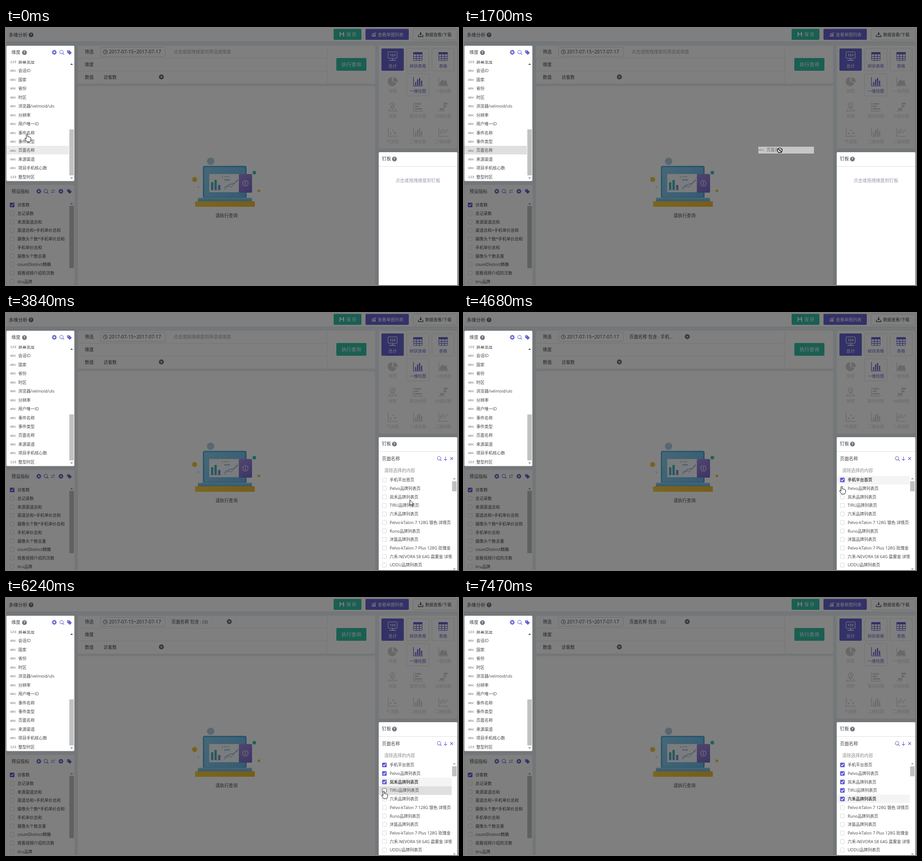
These frames come from a looping animation (992x565 px, 7720 ms). An HTML page with a canvas:

```html
<!DOCTYPE html>
<html lang="zh-CN">
<head>
<meta charset="utf-8">
<title>多维分析</title>
<style>
html, body { margin: 0; width: 100%; height: 100%; overflow: hidden; background: #7f7f7f; }
canvas { display: block; }
</style>
</head>
<body>
<canvas id="stage" width="992" height="565"></canvas>
<script>
const c = document.getElementById('stage').getContext('2d');
const LOOP = 7720, PURPLE = '#6663cf', GREEN = '#34bfa3', INK = '#454545', PALE = '#d2d2d2';

// ---- drawing helpers ----
function text(s, x, cy, size = 9, color = INK, align = 'left', weight = 400) {
  c.font = `${weight} ${size}px "Open Sans", "Noto Sans CJK SC", "Noto Sans CJK", sans-serif`;
  c.textAlign = align;
  c.fillStyle = color;
  c.fillText(s, x, cy + size * 0.37);
}
function tag(s, x, cy, color = '#6d7078') {
  c.font = '8px "Liberation Sans", sans-serif';
  c.textAlign = 'left';
  c.fillStyle = color;
  c.fillText(s, x, cy + 2.4);
}
function box(x, y, w, h, fill, r = 0, stroke) {
  c.beginPath();
  c.roundRect(x, y, w, h, r);
  if (fill) { c.fillStyle = fill; c.fill(); }
  if (stroke) { c.strokeStyle = stroke; c.lineWidth = 1; c.stroke(); }
}
function dot(x, y, r, fill) {
  c.beginPath();
  c.arc(x, y, r, 0, 7);
  c.fillStyle = fill;
  c.fill();
}
function ring(x, y, r, color, w = 1) {
  c.beginPath();
  c.arc(x, y, r, 0, 7);
  c.strokeStyle = color;
  c.lineWidth = w;
  c.stroke();
}
function line(color, w, ...p) {
  c.beginPath();
  for (let i = 0; i < p.length; i += 2) c.lineTo(p[i], p[i + 1]);
  c.strokeStyle = color;
  c.lineWidth = w;
  c.stroke();
}
function poly(color, ...p) {
  c.beginPath();
  for (let i = 0; i < p.length; i += 2) c.lineTo(p[i], p[i + 1]);
  c.closePath();
  c.fillStyle = color;
  c.fill();
}
function clipped(x, y, w, h, draw) {
  c.save();
  c.beginPath();
  c.rect(x, y, w, h);
  c.clip();
  draw();
  c.restore();
}
function gradient(x0, y0, x1, y1, a, b) {
  const g = c.createLinearGradient(x0, y0, x1, y1);
  g.addColorStop(0, a);
  g.addColorStop(1, b);
  return g;
}

// ---- icons ----
function help(x, y) {
  dot(x, y, 5.2, '#6c707c');
  text('?', x, y, 8, '#fff', 'center', 700);
}
function gear(x, y) {
  ring(x, y, 3.2, PURPLE, 2.4);
  for (let i = 0; i < 8; i++) {
    const a = i * Math.PI / 4, s = Math.sin(a), k = Math.cos(a);
    line(PURPLE, 1.8, x + 3 * k, y + 3 * s, x + 5.4 * k, y + 5.4 * s);
  }
}
function lens(x, y) {
  ring(x - 0.7, y - 0.7, 3.8, PURPLE, 1.1);
  line(PURPLE, 1.3, x + 2, y + 2, x + 5, y + 5);
}
function label(x, y) {
  poly(PURPLE, x - 5, y - 4.5, x, y - 4.5, x + 5.5, y + 1, x + 1, y + 5.5, x - 5, y);
  dot(x - 2.6, y - 2.3, 0.9, '#fff');
}
function closeDot(x, y) {
  dot(x, y, 5.4, '#6f6f6f');
  line('#fff', 1.1, x - 1.8, y - 1.8, x + 1.8, y + 1.8);
  line('#fff', 1.1, x + 1.8, y - 1.8, x - 1.8, y + 1.8);
}
function check(x, y, state, edge = '#d4d4d4') {
  if (state === 'on') {
    box(x - 5, y - 5, 10, 10, '#5d59d0', 1.5);
    line('#fff', 1.5, x - 2.8, y, x - 0.8, y + 2.2, x + 3, y - 2.4);
  } else if (state === 'press') {
    box(x - 4.5, y - 4.5, 9, 9, '#dddcf3', 1.5, '#5d59d0');
  } else {
    box(x - 4.5, y - 4.5, 9, 9, '#fff', 1.5, edge);
  }
}
const upArrow = (x, y, col) => poly(col, x - 3, y + 1.5, x, y - 1.8, x + 3, y + 1.5);
const downArrow = (x, y, col) => poly(col, x - 3, y - 1.5, x, y + 1.8, x + 3, y - 1.5);

function gridIcon(x, y, col) {
  box(x - 9.5, y - 9, 19, 18, null, 1, col);
  box(x - 10, y - 9.5, 20, 5, col);
  for (const d of [-3.3, 3.3]) line(col, 1.3, x + d, y - 5, x + d, y + 9);
  for (const d of [0, 4.6]) line(col, 1.3, x - 10, y + d, x + 10, y + d);
}
function axes(x, y, col) {
  line(col, 1.3, x - 9.5, y - 10, x - 9.5, y + 9.5, x + 11, y + 9.5);
}
function barIcon(x, y, col) {
  axes(x, y, col);
  [7, 13, 16, 10].forEach((h, i) => box(x - 6 + i * 4.3, y + 8 - h, 2.5, h, col));
}
function hBarIcon(x, y, col) {
  axes(x, y, col);
  [14, 9, 16].forEach((w, i) => box(x - 7, y - 8 + i * 5.5, w, 3, col));
}
function flagIcon(x, y, col) {
  line(col, 1.2, x - 10, y + 9, x + 2, y + 9, x + 2, y - 10);
  box(x + 2, y - 9, 8, 4, col);
  box(x + 2, y - 3, 5, 4, col);
  box(x - 7, y + 3, 8, 4, col);
}
function pieIcon(x, y, col) {
  c.fillStyle = col;
  for (const [dx, a, b] of [[-1, 0.3, 4.7], [1.5, 4.75, 6.4]]) {
    c.beginPath();
    c.moveTo(x + dx, y);
    c.arc(x + dx, y, 10, a, b);
    c.fill();
  }
}
function areaIcon(x, y, col) {
  axes(x, y, col);
  poly(col, x - 8, y + 8, x - 8, y + 3, x - 2, y - 5, x + 3, y - 1, x + 7, y - 4, x + 10, y + 8);
}
function lineIcon(x, y, col) {
  axes(x, y, col);
  line(col, 1.3, x - 7, y + 5, x - 2, y - 1, x + 3, y + 2, x + 10, y - 6);
  line(col, 1.3, x - 7, y, x - 1, y - 6, x + 4, y - 3);
}
function bubbleIcon(x, y, col) {
  axes(x, y, col);
  dot(x - 4, y + 3, 1.8, col);
  dot(x + 1, y - 4, 1.5, col);
  dot(x + 6, y + 2, 2, col);
}
function mapIcon(x, y, col) {
  ring(x, y - 4, 5, col, 1.4);
  dot(x, y - 4, 1.8, col);
  line(col, 1.4, x - 4, y, x, y + 6, x + 4, y);
  line(col, 1.3, x - 5, y + 4, x - 9, y + 9, x + 9, y + 9, x + 5, y + 4);
}
function totalIcon(x, y, col) {
  box(x - 10, y - 10, 20, 14, null, 1.5, col);
  text('123', x, y - 3, 7.5, col, 'center', 700);
  line(col, 1.5, x, y + 4, x, y + 8);
  line(col, 1.5, x - 7, y + 8.5, x + 7, y + 8.5);
}

// ---- page sections under the shade ----
function header() {
  box(0, 0, 992, 30, '#fff');
  line('#d9dde2', 1, 0, 30.5, 992, 30.5);
  text('多维分析', 6, 15, 10.3);
  help(55, 15);
  box(719, 2, 61, 24, GREEN, 2);
  box(732, 9, 10, 10, '#fff', 1);
  box(734.5, 9, 5, 3.5, GREEN);
  box(734, 14.5, 6, 4.5, GREEN);
  text('保 存', 747, 14.5, 9.7, '#fff');
  box(789, 2, 95, 24, PURPLE, 2);
  line('#fff', 1.4, 803, 15, 806, 12, 808, 13.5, 812, 9.5);
  [3, 4, 5].forEach((h, i) => box(803 + i * 3, 19 - h, 2, h, '#fff'));
  text('查看单图列表', 816, 14.5, 9.4, '#fff');
  box(893.5, 2.5, 97, 24, '#fff', 2, '#dcdcdc');
  line(INK, 1.8, 910, 9, 910, 14);
  downArrow(910, 14.5, INK);
  line(INK, 1.3, 905, 15, 905, 19, 915, 19, 915, 15);
  text('数据查看/下载', 920, 15, 9.1);
}

function query(t) {
  box(158, 39, 652, 83, '#fff', 2);
  for (const y of [66.5, 94.5]) line('#e7e7e7', 1, 158, y, 704, y);
  line('#e7e7e7', 1, 704.5, 39, 704.5, 122);
  ['筛选', '维度', '数值'].forEach((s, i) => text(s, 173, 52 + i * 28, 9.7));
  box(207.5, 42.5, 142, 20, '#fff', 2, '#dcdcdc');
  ring(218, 52.5, 4.5, '#555');
  line('#555', 1, 218, 49.5, 218, 53, 220.5, 53);
  text('2017-07-15~2017-07-17', 226, 52.5, 10.4);
  const n = CLICKS.filter(k => t >= k).length;
  if (n) {
    text('页面名称 包含 : ' + (n > 1 ? `(${n})` : '手机...'), 363, 52, 9.7);
    closeDot(490, 52);
  } else {
    text('点击或拖拽维度到筛选或维度', 368, 52, 9.7, '#a9a9a9');
  }
  text('访客数', 214, 108, 9.7);
  closeDot(341, 107.5);
  box(725, 66, 66, 28, GREEN, 2);
  text('执行查询', 758, 80, 10.7, '#fff', 'center');
}

function laptop() {
  dot(449, 293, 8, '#b3cfe6');
  dot(545, 318, 4, '#3bc8b0');
  dot(414, 333, 5.5, '#f2c53c');
  dot(555, 358, 3, '#f2c53c');
  dot(422, 350, 2, '#bfe0e6');
  box(432, 303, 96, 71, gradient(432, 303, 528, 374, '#58b4e2', '#4a9fd8'), 4);
  box(435, 306, 90, 66, gradient(435, 306, 525, 372, '#8ed0ee', '#69b9e6'), 2);
  box(446, 321, 72, 40, '#f5f9fd', 1);
  [[450, 17, '#3cbf9f'], [457.5, 22, '#3cbf9f'], [465.5, 11, '#8f85d6']].forEach(([x, h, col]) =>
    box(x, 356 - h, 5, h, gradient(0, 356 - h, 0, 356, col, '#56a7d8'), 1));
  line('#b6c6d4', 0.7, 448, 356.5, 472, 356.5);
  line('#59b6a5', 1, 479, 355, 488, 347, 494, 350, 509, 332);
  line('#7184b8', 1, 479, 351, 490, 344, 500, 342, 509, 335);
  line('#9eacba', 1, 475, 325, 475, 330);
  for (let i = 0; i < 3; i++) {
    box(479 + i * 4, 326, 2.5, 1.5, '#9eacba');
    dot(481 + i * 4, 334, 1.4, ['#3cbf9f', '#5ba8df', '#8b80da'][i]);
  }
  box(511, 321, 29, 41, gradient(511, 321, 540, 362, '#a68ce0', '#7769c8'), 2);
  ring(525.5, 341.5, 6, '#eee9fb', 1.2);
  dot(525.5, 338.5, 0.9, '#fff');
  line('#fff', 1.3, 525.5, 340.5, 525.5, 345);
  box(421, 373, 119, 9, gradient(421, 373, 421, 382, '#a4d8f1', '#58aee0'), 2);
  for (let x = 428; x < 534; x += 5) line('#5daad3', 1.2, x, 376, x + 3, 376);
  box(415, 381, 131, 12, gradient(415, 381, 546, 393, '#f7cc40', '#eebd35'), 1);
  text('请执行查询', 484, 412.5, 9.7, INK, 'center');
}

const TILES = [
  ['总计', totalIcon], ['树状表格', gridIcon], ['表格', gridIcon],
  ['饼图', pieIcon], ['一维柱图', barIcon], ['一维线图', areaIcon],
  ['地图', mapIcon], ['簇状柱图', hBarIcon], ['分组柱图', flagIcon],
  ['气泡图', bubbleIcon], ['二维柱图', barIcon], ['二维线图', lineIcon]
];
function tiles() {
  box(818, 39, 172, 226, '#fff', 2);
  TILES.forEach(([name, icon], i) => {
    const x = 848.5 + (i % 3) * 55.4, y = 62.5 + Math.floor(i / 3) * 55.4;
    const live = [1, 2, 4].includes(i);
    if (!i) box(824, 45, 49, 49, PURPLE, 2);
    if (live) box(x - 24.5, y - 17.5, 49, 49, '#fff', 2, '#e2e2e2');
    const col = !i ? '#fff' : live ? PURPLE : PALE;
    icon(x, y, col);
    text(name, x, y + 20.8, i ? 9 : 9.5, col, 'center');
  });
}

const PRESETS = ['访客数', '总记录数', '来源渠道总和', '渠道总和+手机单价总和', '摄像头个数*手机单价总和',
  '手机单价总和', '摄像头个数去重', 'countDistinct精确', '观看视频介绍的次数', 'tiru品牌'];
function presets() {
  box(1, 345, 149, 220, '#fff', 2);
  text('预设指标', 12, 359.5, 9.8);
  gear(72, 359);
  lens(88, 359);
  line(PURPLE, 1, 99, 357, 107, 357, 105, 355);
  line(PURPLE, 1, 107, 361, 99, 361, 101, 363);
  dot(120.5, 359, 5, PURPLE);
  line('#fff', 1.2, 118, 359, 123, 359);
  line('#fff', 1.2, 120.5, 356.5, 120.5, 361.5);
  label(139, 359);
  PRESETS.forEach((s, i) => {
    const y = 389 + i * 18.7;
    check(13.5, y, i ? 'off' : 'on', '#dcdcdc');
    text(s, 25, y);
  });
  upArrow(144, 386, '#8a8a8a');
  box(139, 391, 10, 137, '#c1c1c1');
}

// ---- lit panels ----
const DIMS = ['屏幕宽度', '会话ID', '国家', '省份', '时区', '浏览器/velmoid/uls', '分辨率', '用户唯一ID',
  '事件名称', '事件类型', '页面名称', '来源渠道', '项目手机核心数', '整型时区'];
const DIM_STEP = 19.46, dimY = i => 74.5 + i * DIM_STEP;

function dimensions(t) {
  box(1, 39, 149, 297.5, '#fff', 2);
  text('维度', 12, 53.5, 9.8);
  help(40.5, 54);
  gear(106, 53.5);
  lens(122.5, 53.5);
  label(139, 53.5);
  let hover = -1;
  if (t < 150 || (t >= 820 && t < 3450)) hover = 10;
  else if (t < 820) hover = Math.round((cursorAt(t - 130)[1] - 74.5) / DIM_STEP);
  clipped(1, 72, 148, 264, () => {
    DIMS.forEach((s, i) => {
      const y = dimY(i);
      if (i === hover) box(1, Math.round(y - 10), 137, 19, t < 150 ? '#ebebeb' : '#dfdfdf');
      tag(i % 13 ? 'abc' : '123', 9, y);
      text(s, 27, y);
    });
  });
  upArrow(144, 79.5, '#505050');
  downArrow(144, 330, '#8a8a8a');
  box(139, 223, 10, 101, '#c1c1c1');
}

const PAGES = ['手机平台首页', 'Pelvo品牌列表页', '岚禾品牌列表页', 'TIRU品牌列表页', '六禾品牌列表页',
  'Pelvo-kTalon 7 128G 银色 详情页', 'Runo品牌列表页', '沐笛品牌列表页',
  'Pelvo-kTalon 7 Plus 128G 玫瑰金 详情页', '六禾-NEVORA S8 64G 晨雾金 详情页', 'UDDU品牌列表页'];
const CLICKS = [4410, 4950, 5790, 6340, 6740], PAGE_STEP = 18.7;

function pageRows(t) {
  const active = CLICKS.filter(k => t >= k).length - 1;
  const [hx, hy] = cursorAt(t - 130);
  const hover = t > 4480 && hx > 818 ? Math.round((hy - 367) / PAGE_STEP) : -1;
  clipped(818, 357, 160, 208, () => {
    PAGES.forEach((s, i) => {
      const y = 367 + i * PAGE_STEP, pressed = i === 4 && i === active && t < 6890;
      const bg = pressed ? '#e5e5e5' : i === active ? '#f4f4f4' : i === hover ? '#dfdfdf' : null;
      if (bg) box(818, Math.round(y - 9.5), 160, 19, bg);
      check(830.5, y, pressed ? 'press' : i <= active ? 'on' : 'off', i === hover ? '#555' : undefined);
      text(s, 842, y, 9, INK, 'left', i === active ? 700 : 400);
    });
  });
  upArrow(984, 364, '#9a9a9a');
  box(979, 370, 10, 22, '#c1c1c1');
  downArrow(984, 563, '#9a9a9a');
}

function pinboard(t) {
  box(818, 273, 172.5, 300, '#fff', 2);
  text('钉板', 825, 287.5, 10);
  help(852.5, 288);
  line('#dfdfdf', 1, 818, 304.5, 990, 304.5);
  if (t < 2930) {
    text('点击或拖拽维度到钉板', 855, 335.5, 9.8, '#9b98b4');
    return;
  }
  text('页面名称', 825, 320.5, 9.9);
  lens(951, 320);
  line(PURPLE, 1.1, 964.5, 315.5, 964.5, 324);
  line(PURPLE, 1.1, 961.5, 321, 964.5, 324, 967.5, 321);
  line(PURPLE, 1.1, 975, 317, 981, 323);
  line(PURPLE, 1.1, 981, 317, 975, 323);
  text('清除选择的内容', 830, 346.5, 9.7, '#8b8b8b');
  if (t >= 3050) pageRows(t);
}

// ---- pointer ----
const BURSTS = [[150, 820, 6], [1200, 2180, 9], [2300, 2420, 2], [3330, 4260, 8],
  [4410, 5370, 8], [5520, 6480, 8], [6600, 7470, 7]];
const PATH = [[0, 46, 233], [150, 46, 237], [820, 55, 268], [1080, 55, 268], [1200, 110, 268],
  [1440, 450, 268], [1690, 693, 269], [1940, 810, 290], [2180, 869, 349], [2300, 886, 361],
  [2420, 874, 358], [3200, 874, 358], [3800, 888, 418], [4260, 829, 368], [4410, 829, 369],
  [4684, 829, 381], [4950, 830, 386], [5370, 830, 398], [5520, 830, 405], [5930, 829, 407],
  [6200, 829, 424], [6480, 831, 436], [6600, 842, 441], [6745, 865, 455], [7180, 868, 560],
  [7320, 870, 600]];

function stepTime(t) {
  let out = 0;
  for (const [a, b, n] of BURSTS) {
    if (t < a) break;
    const d = (b - a) / (n - 1);
    out = Math.min(b, a + Math.floor((t - a + 5) / d) * d);
  }
  return out;
}
function cursorAt(t) {
  const s = stepTime(t), i = PATH.findIndex(p => p[0] > s);
  if (i < 0) return PATH[PATH.length - 1].slice(1);
  const a = PATH[i - 1], b = PATH[i], u = (s - a[0]) / (b[0] - a[0]);
  return [a[1] + (b[1] - a[1]) * u, a[2] + (b[2] - a[2]) * u];
}

const ARROW = new Path2D('M0 0V12.2L2.8 9.6L4.8 14L6.8 13.1L4.9 8.9H8.8Z');
const HAND = new Path2D('M-1.5 1Q0 -1 1.5 1V6Q3 5 4 6.5Q5.5 5.6 6.4 7.2Q8.2 6.6 8.5 8.6V12Q8 15 6.5 17H-.5Q-2 14 -4.5 10.8Q-5 8.6 -3 9L-1.5 10.6Z');
function shape(path, x, y) {
  c.save();
  c.translate(x, y);
  c.lineJoin = 'round';
  c.lineWidth = 1;
  c.fillStyle = '#fff';
  c.strokeStyle = '#111';
  c.fill(path);
  c.stroke(path);
  c.restore();
}
function noDrop(x, y) {
  for (const [col, w] of [['#fff', 3.4], ['#111', 1.7]]) {
    ring(x, y, 5.5, col, w);
    line(col, w, x - 3.9, y - 3.9, x + 3.9, y + 3.9);
  }
}
function pointer(t) {
  const [x, y] = cursorAt(t);
  if (t >= 1200 && t < 2810) {
    c.globalAlpha = 0.75;
    box(x - 47, y - 8, 122, 15, '#dedede');
    tag('abc', x - 47, y - 1);
    text('页面名称', x - 29, y - 1);
    c.globalAlpha = 1;
  }
  if (t >= 1200 && t < 2300) return noDrop(x, y);
  const arrow = (t >= 2300 && t < 4260) || (t >= 5370 && t < 5780);
  shape(arrow ? ARROW : HAND, x, y);
  if (t >= 2300 && t < 2810) box(x + 4.5, y + 13.5, 9, 5, '#fff', 0, '#555');
}

function draw(now) {
  const t = now % LOOP;
  box(0, 0, 992, 565, '#e9eff4');
  header();
  query(t);
  box(158, 128, 652, 440, '#fff', 2);
  laptop();
  tiles();
  presets();
  box(0, 0, 992, 565, 'rgba(0,0,0,.5)');
  dimensions(t);
  pinboard(t);
  pointer(t);
}

const start = performance.now();
function tick() {
  draw(performance.now() - start);
  requestAnimationFrame(tick);
}
tick();
</script>
</body>
</html>
```
